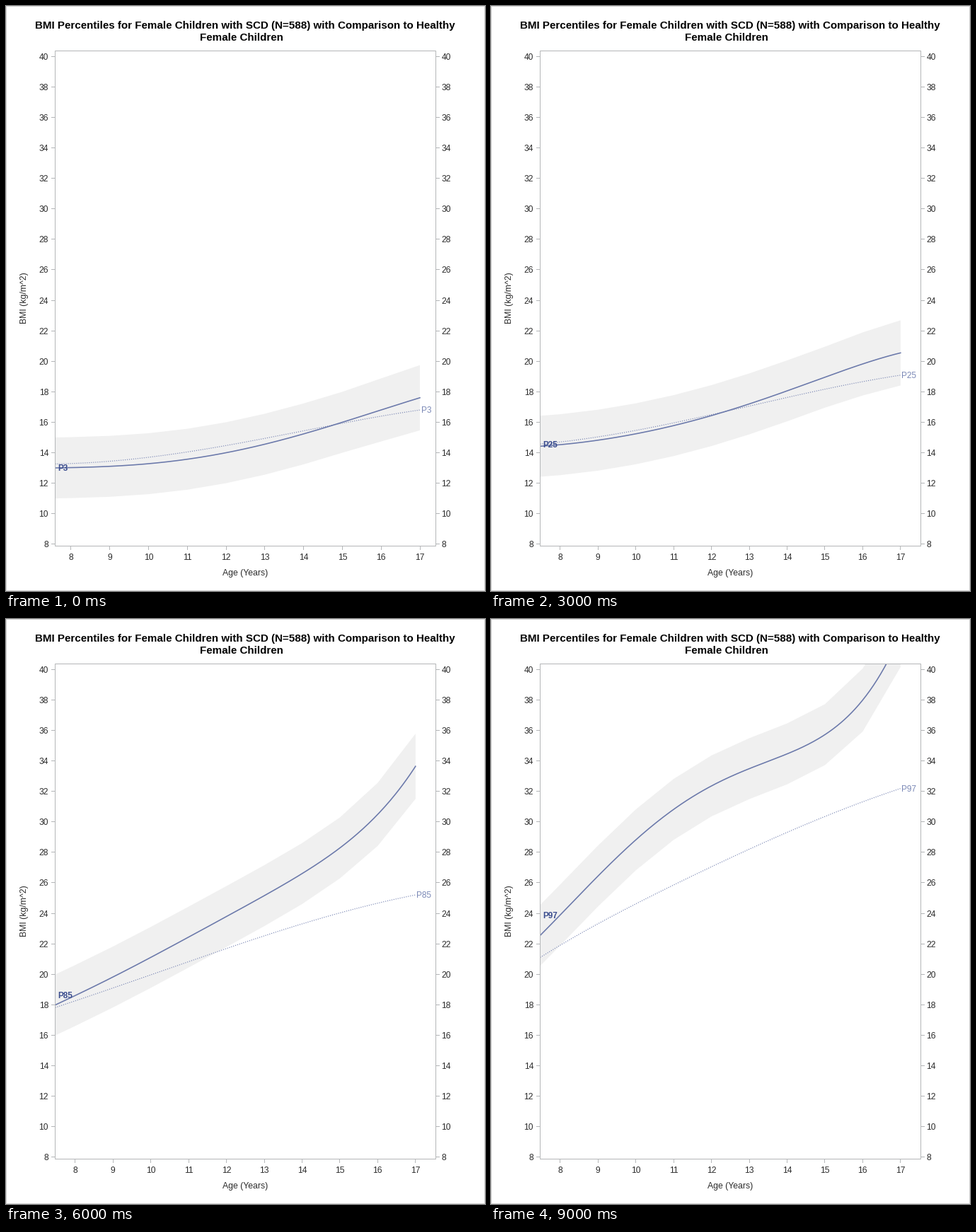
A matplotlib script that plays this animation: 677 px wide and 827 px high, repeating every 10000 ms.

```python
import numpy as np
import matplotlib.pyplot as plt
from matplotlib.animation import FuncAnimation
from matplotlib.patches import Rectangle

W, H, DPI = 677, 827, 100
LEFT, TOP, RIGHT, BOTTOM = 69.5, 63.5, 607.5, 763.5
GREY, INK = "#b4b6b8", "#2b2b2b"
PX = 72 / DPI  # points per pixel

plt.rcParams["font.family"] = "Liberation Sans"

# Percentile and its normal quantile
Z = {3: -1.881, 5: -1.645, 10: -1.282, 25: -0.674, 50: 0,
     75: 0.674, 85: 1.036, 90: 1.282, 95: 1.645, 97: 1.881}
PERCENTILES = list(Z)


def poly(ages, values):
    """Polynomial through a few key points."""
    return np.poly1d(np.polyfit(np.array(ages) - 12, values, len(ages) - 1))


# Children with SCD: one curve per percentile, three of them blended
KEY_AGES = (7.5, 9.5, 12, 14.5, 16, 17)
SCD = {
    3: poly(KEY_AGES, (12.99, 13.17, 13.99, 15.60, 16.80, 17.60)),
    10: poly(KEY_AGES, (13.78, 14.10, 15.20, 17.07, 18.29, 18.89)),
    50: poly(KEY_AGES, (15.56, 16.62, 18.61, 21.04, 22.54, 23.49)),
    75: poly(KEY_AGES, (16.89, 18.74, 21.42, 23.99, 25.44, 26.51)),
    90: poly(KEY_AGES, (18.54, 21.26, 24.90, 29.01, 32.87, 37.01)),
    95: poly(KEY_AGES, (20.45, 24.77, 29.85, 33.77, 36.68, 39.77)),
    97: poly(KEY_AGES, (22.62, 27.67, 32.36, 35.02, 38.00, 42.30)),
}
for p, low, high, share in ((5, 3, 10, 0.43), (25, 10, 50, 0.36), (85, 75, 90, 0.68)):
    SCD[p] = SCD[low] * (1 - share) + SCD[high] * share

# Healthy children: LMS method (skewness, median, variation)
SKEW = poly((8, 11, 14, 17), (-2.66, -2.03, -1.975, -2.19))
MEDIAN = poly((8, 11, 14, 17), (15.78, 17.43, 19.33, 20.89))
VARIATION = poly((8, 11, 14, 17), (0.1163, 0.1443, 0.1509, 0.1486))


def scd_bmi(age, p):
    return SCD[p](age - 12)


def healthy_bmi(age, p):
    t = age - 12
    skew = SKEW(t)
    return MEDIAN(t) * (1 + skew * VARIATION(t) * Z[p]) ** (1 / skew)


def y_pos(bmi):
    return 760.5 - (bmi - 8) * 689 / 32


def x_scale(p):
    """Pixel of age 8 and pixels per year."""
    x8, x17 = (91.9, 585.0) if p <= 5 else (97.8, 578.8)
    return x8, (x17 - x8) / 9


fig = plt.figure(figsize=(W / DPI, H / DPI), dpi=DPI, facecolor="white")
ax = fig.add_axes([0, 0, 1, 1])
ax.set_xlim(0, W)
ax.set_ylim(H, 0)
ax.axis("off")


def cap_drop(size):
    return 0.355 * size


def label(x, y, s, size=12, ha="center", color=INK, **kw):
    """Text whose capitals are centred on y."""
    return ax.text(x, y + cap_drop(size), s, fontsize=size * PX, ha=ha,
                   va="baseline", color=color, **kw)


def centre(v):
    """Middle of the pixel that holds v."""
    return np.floor(v) + 0.5


def segment(xs, ys):
    return ax.plot(xs, ys, color=GREY, lw=PX, solid_capstyle="butt",
                   snap=False, zorder=4)[0]


def box(x0, y0, x1, y1, color):
    ax.add_patch(Rectangle((x0, y0), x1 - x0, y1 - y0, fill=False,
                           ec=color, lw=PX, snap=False, zorder=4))


box(0.5, 0.5, W - 0.5, H - 0.5, "#d2d2d2")
box(LEFT, TOP, RIGHT, BOTTOM, GREY)

title = dict(size=15.15, color="black", weight="bold")
label(338, 26.5, "BMI Percentiles for Female Children with SCD (N=588) "
      "with Comparison to Healthy", **title)
label(333, 43.5, "Female Children", **title)
label(338.5, 801, "Age (Years)", 12.3)
ax.text(26.5, 412.5, "BMI (kg/m^2)", fontsize=12.3 * PX, rotation=90,
        ha="center", va="center", color=INK)

for bmi in range(8, 41, 2):
    y = centre(y_pos(bmi))
    segment([LEFT - 5.5, LEFT - 0.5], [y, y])
    segment([RIGHT + 0.5, RIGHT + 5.5], [y, y])
    label(60, y, str(bmi), ha="right")
    label(615.5, y, str(bmi), ha="left")

years = range(8, 18)
ticks = [segment([0, 0], [BOTTOM + 0.5, BOTTOM + 5.5]) for _ in years]
tick_labels = [label(0, 779, str(a)) for a in years]

clip = Rectangle((LEFT + 0.5, TOP + 0.5), RIGHT - LEFT - 1, BOTTOM - TOP - 1,
                 transform=ax.transData)
band, = ax.fill([0, 0, 1], [0, 1, 1], color="#f0f0f0", lw=0, zorder=1)
dots, = ax.plot([], [], color="#7885b3", lw=1.15 * PX, dashes=(1, 1.6),
                dash_capstyle="butt", zorder=2)
line, = ax.plot([], [], color="#6a78aa", lw=1.6 * PX, zorder=3)
for artist in (band, dots, line):
    artist.set_clip_path(clip)

P_SIZE = 11.7
scd_label = label(73.6, 0, "", P_SIZE, "left", "#3c4e8f", weight="bold", zorder=5)
healthy_label = label(0, 0, "", P_SIZE, "left", "#7a88b6", zorder=5)


def draw(n):
    p = PERCENTILES[n]
    x8, step = x_scale(p)
    start = 8 - (x8 - LEFT) / step

    age = np.linspace(start, 17, 200)
    x = x8 + (age - 8) * step
    line.set_data(x, y_pos(scd_bmi(age, p)))
    dots.set_data(x, y_pos(healthy_bmi(age, p)))

    # The band has straight sides between whole years and widens at the end
    knots = np.r_[start, years]
    mid = scd_bmi(knots, p)
    half = 2 + 0.07 * np.clip(knots - 15, 0, 2)
    edge = x8 + (knots - 8) * step
    band.set_xy(np.column_stack([
        np.r_[edge, edge[::-1]],
        y_pos(np.r_[mid + half, (mid - half)[::-1]])]))

    for a, tick, text in zip(years, ticks, tick_labels):
        tx = x8 + (a - 8) * step
        tick.set_xdata([centre(tx)] * 2)
        text.set_x(tx)

    drop = cap_drop(P_SIZE)
    scd_label.set_text(f"P{p}")
    scd_label.set_y(y_pos(scd_bmi(8, p)) + drop)
    healthy_label.set_text(f"P{p}")
    healthy_label.set_position((x[-1] + 1.6, y_pos(healthy_bmi(17, p)) + drop))
    return line, dots, band, scd_label, healthy_label


anim = FuncAnimation(fig, draw, frames=len(PERCENTILES), interval=1000,
                     repeat=True, repeat_delay=0, blit=False)
plt.show()
```
